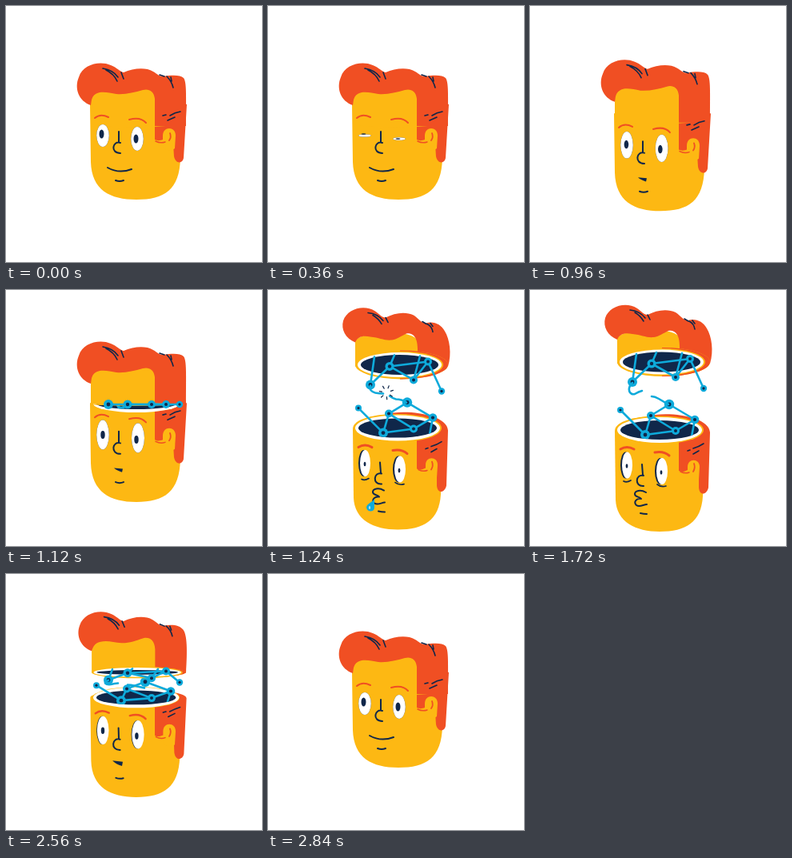
Animation, 320 px wide and 320 px high, one loop 2.88 s. Source, as an HTML page with a canvas:

```html
<!DOCTYPE html>
<html lang="en">
<head>
<meta charset="utf-8">
<title>Open mind</title>
<style>
html, body { margin: 0; width: 100%; height: 100%; overflow: hidden; background: #fff; }
canvas { display: block; width: 100vw; height: 100vh; }
</style>
</head>
<body>
<canvas id="stage" width="320" height="320"></canvas>
<script>
const ctx = document.getElementById('stage').getContext('2d');
const YELLOW = '#fdb813', RED = '#f04f23', NAVY = '#10274a', CYAN = '#0eaadb', WHITE = '#fff';
const LOOP = 2880;

// pose: 0 closed, 1 cracked, 2 wide open
let pose = 0;

const clamp = x => Math.max(0, Math.min(1, x));
const span = (t, a, b) => clamp((t - a) / (b - a));
const smooth = x => x * x * (3 - 2 * x);
const mix = (a, b, k) => a + (b - a) * k;

// Cracking lifts the lid and stretches the lower head.
const lidY = y => y - 7;
const headY = y => 265 + (y - 242) * 1.037;

// Blend a closed path into an open one; all coordinates are x y pairs.
function blend(closed, open, crackY) {
  const end = open.match(/-?[\d.]+/g);
  let i = 0;
  return closed.replace(/-?[\d.]+/g, n => {
    const from = +n, mid = i % 2 ? crackY(from) : from, to = +end[i++];
    return pose < 1 ? mix(from, mid, pose) : mix(mid, to, pose - 1);
  });
}

const tri = (a, b, c) => a.map((v, i) =>
  pose < 1 ? mix(v, b[i], pose) : mix(b[i], c[i], pose - 1));

function fill(d, color) {
  ctx.fillStyle = color;
  ctx.fill(new Path2D(d));
}

function line(d, color = NAVY, width = 1.8) {
  ctx.strokeStyle = color;
  ctx.lineWidth = width;
  ctx.stroke(new Path2D(d));
}

function oval([x, y, rx, ry], color) {
  ctx.fillStyle = color;
  ctx.beginPath();
  ctx.ellipse(x, y, Math.max(0, rx), Math.max(0, ry), 0, 0, 7);
  ctx.fill();
}

function shifted(dy, paint) {
  ctx.save();
  ctx.translate(0, dy);
  paint();
  ctx.restore();
}

function net(nodes, links, rimY, k) {
  const at = ([x, y]) => [x, rimY + y * k];
  for (const [a, b] of links) line(`M${at(nodes[a])} L${at(nodes[b])}`, CYAN, 2.6);
  for (const n of nodes) {
    if (!n[2]) continue;
    const [x, y] = at(n);
    oval([x, y, n[2], n[2]], CYAN);
    oval([x, y, n[2] * .4, n[2] * .4], NAVY);
  }
}

// Node heights are relative to the rim; a radius of 0 is a hidden anchor.
const lowNodes = [[113, -25, 4], [144, 6, 6], [151, -18, 5], [174, -32, 6.2], [182, 1, 5], [206, -13, 5.3], [202, 8, 0]];
const lowLinks = [[0, 1], [1, 2], [2, 3], [2, 4], [3, 5], [4, 5], [1, 4], [5, 6]];
const topNodes = [[128, 25, 6], [152, 2, 5.5], [182, 19, 5], [200, -4, 5], [217, 33, 4.2], [158, -12, 0], [190, -11, 0], [133, -10, 0]];
const topLinks = [[0, 1], [1, 2], [2, 3], [3, 4], [1, 5], [1, 3], [2, 6], [0, 7]];

function lowerHead() {
  fill(blend(
    'M105 123 L106 195 C107 230 130 242 163 242 C198 242 217 230 218 190 L222 123 C222 120 105 120 105 123',
    'M106 176 L107 262 C108 290 132 302 162 302 C195 302 214 290 216 258 L220 176 C220 151 106 151 106 176', headY), YELLOW);
  fill(blend(
    'M186 123 L186 167 C190 169 193 168 196 167 L209 172 L210 188 C212 198 221 197 222 190 L226 123 C226 122 186 122 186 123',
    'M186 176 L186 226 C190 228 193 227 197 225 L211 230 L211 247 C212 258 221 256 223 247 L225 178 C224 157 170 151 146 158', headY), RED);
  fill(blend(
    'M196 176 L196 162 C196 150 212 150 212 162 L211 178 C206 182 198 180 196 176',
    'M197 234 L197 221 C197 210 212 210 212 221 L211 237 C206 240 199 238 197 234', headY), YELLOW);
  line(blend('M205 159 Q207 164 204 168', 'M205 217 Q207 222 204 227', headY), RED);
  line(blend('M187 169 Q193 172 199 170', 'M188 227 Q194 230 199 228', headY), RED, 1.5);

  const rim = tri([163, 123, 54, 0], [163, 142, 54, 11], [162, 175, 53, 16]);
  const [x, y, rx, ry] = rim, edge = clamp(pose - 1);
  oval([x, y, rx + 2 * edge, ry + 1.5 * edge], YELLOW);
  oval(rim, WHITE);
  oval([x, y, rx - 4, ry - 4], NAVY);
  if (pose < .3 || ry < 5) return;
  ctx.save();
  ctx.beginPath();
  ctx.rect(0, -20, 320, y + 20);
  ctx.ellipse(x, y, rx - 4, ry - 4, 0, 0, Math.PI);
  ctx.clip();
  net(lowNodes, lowLinks, y, clamp(pose - .6) * clamp(pose / 2 + .1));
  ctx.restore();
}

function lid() {
  fill(blend(
    'M106 149 L106 118 C108 95 180 90 187 100 L200 150 Q155 154 106 149',
    'M109 92 L109 60 C115 48 180 44 187 60 L200 91 Q155 95 109 92', lidY), YELLOW);
  fill(blend(
    'M106 124 C91 119 85 103 91 89 C96 73 117 68 131 74 C139 77 142 82 147 83 C159 78 174 76 184 82 C189 85 192 88 196 88 C208 86 218 86 222 90 C226 95 225 112 225 150 L186 150 L186 116 C185 106 178 103 171 105 C160 108 149 111 138 110 C128 108 118 106 112 110 C106 114 107 120 106 124',
    'M109 62 C97 57 91 46 94 35 C99 20 120 14 134 23 C140 27 142 31 147 31 C158 25 172 23 182 28 C188 32 192 38 197 38 C207 35 216 39 221 48 C227 58 230 76 225 92 L187 91 L187 70 C187 54 180 50 173 51 C166 54 162 58 155 59 C145 60 140 56 128 55 C118 53 112 55 109 62', lidY), RED);
  line(blend(
    'M121 78 Q134 80 140 89 M125 80 Q135 85 139 94 M144 83 L147 91 M192 86 L198 88 M201 88 Q207 94 209 102 M206 89 L207 94',
    'M125 25 Q137 26 144 35 M131 28 Q138 32 142 39 M147 31 L150 37 M193 36 L198 39 M199 39 Q205 42 206 49 M203 38 L206 42', lidY), NAVY, 1.6);

  if (pose <= 1) return;
  const outer = tri([0, 0, 0, 0], [165, 143, 59, 0], [167, 90, 58, 18]);
  const [x, y, rx, ry] = tri([0, 0, 0, 0], [164, 143, 56, 0], [164.5, 90, 52.5, 15.5]);
  oval(outer, YELLOW);
  ctx.save();
  ctx.beginPath();
  ctx.rect(165, 0, 155, 320);
  ctx.clip();
  oval(outer, RED);
  ctx.restore();
  oval([x, y, rx + 2, ry + 1.5], YELLOW);
  oval([x, y, rx, ry], WHITE);
  oval([x, y, rx - 4, ry - 3], NAVY);
  net(topNodes, topLinks, y, pose - 1);
}

function brokenLink(t, bounce) {
  if (pose < 1.3) return;
  const k = pose - 1, curl = smooth(span(t, 1240, 1440));
  const bend = (a, b) => mix(a, b, curl);
  const up = y => mix(143, 90, k) + bounce + (y - 90) * k;
  const down = y => mix(142, 175, k) - .7 * bounce + (y - 175) * k;
  if (t < 1220) {
    line(`M128 ${up(115)} L173 ${down(143)}`, CYAN, 2.6);
    return;
  }
  line(`M128 ${up(116)} C${bend(126, 120)} ${up(bend(121, 124))} ${bend(130, 125)} ${up(bend(124, 132))} ${bend(134, 131)} ${up(bend(125, 130))} Q${bend(139, 136)} ${up(bend(126, 127))} ${bend(144, 140)} ${up(126)}`, CYAN, 2.6);
  line(`M173 ${down(143)} Q${bend(167, 166)} ${down(139)} ${bend(160, 161)} ${down(bend(139, 136))} Q156 ${down(bend(138, 133))} 152 ${down(bend(135, 133))}`, CYAN, 2.6);
  if (t < 1360) {
    const grow = span(t, 1160, 1360);
    for (let i = 0; i < 7; i++) {
      const a = i * Math.PI * 2 / 7 - 1.2, r = 4 + 4 * grow, end = r + 4 * (1.2 - grow);
      line(`M${148 + r * Math.cos(a)} ${128 + r * Math.sin(a)} L${148 + end * Math.cos(a)} ${128 + end * Math.sin(a)}`, NAVY, 1.2);
    }
  }
}

function face(t) {
  const brow = 2 + clamp(pose - 1);
  line(blend('M111 140 Q118 134 128 139', 'M113 199 Q121 194 130 199', headY), RED, brow);
  line(blend('M154 142 Q168 138 175 146', 'M156 203 Q167 201 174 207', headY), RED, brow);
  line(blend(
    'M196 137 L200 136 M205 137 Q211 133 218 132 M202 143 L211 139',
    'M197 201 L200 200 M204 198 Q211 196 217 192 M204 205 L211 201', headY), NAVY, 1.6);

  const blink = 1 - .92 * Math.sin(Math.PI * span(t, 220, 460));
  const shade = 2 * clamp(pose - 1);
  const eye = (a, b, c) => {
    const [x, y, rx, ry] = tri(a, b, c);
    oval([x - shade, y, rx, ry * blink], NAVY);
    oval([x, y, rx, ry * blink], WHITE);
  };
  const pupil = (a, b, c) => {
    const [x, y, rx, ry] = tri(a, b, c);
    oval([x, y, rx, ry * blink], NAVY);
  };
  eye([121, 162, 7.8, 14], [121, 181, 7.8, 18.5], [121.5, 219, 6.5, 16.5]);
  eye([164, 166, 7.8, 15], [165, 185, 8, 18.5], [165, 226.5, 7, 16.5]);
  pupil([119.5, 160, 3, 5.5], [121, 181, 2.7, 5], [121, 220, 1.4, 2.8]);
  pupil([162.5, 166, 3, 5.5], [163, 187, 2.7, 5], [164, 228, 1.4, 2.8]);

  line(blend(
    'M141 157 L141 170 M143 171 C133 168 130 184 143 184',
    'M140 218 L141 231 M142 232 C132 229 130 246 142 245', headY), NAVY, 2);

  if (pose < .5) line(blend('M127 202 Q141 210 157 204', 'M127 254 Q141 258 157 254', headY), NAVY, 2);
  else if (pose < 1.5) fill(blend('M135 201 L146 202 L145 206 Q138 204 135 201', 'M130 251 L146 253 L145 260 Q136 258 130 251', headY), NAVY);
  else line('M145 253 C138 249 131 251 131 255 C131 259 137 258 139 261 C133 260 129 265 133 269 C137 272 142 268 146 268', NAVY, 2);
  line(blend('M137 218 Q142 220 147 218', 'M138 279 Q142 280 146 280', headY), NAVY, 2);

  if (pose > 1.5) {
    ctx.globalAlpha = clamp(pose * 2 - 3);
    line('M117 239 Q121 241 126 238 M159 243 Q164 247 170 245', NAVY, 1.7);
    ctx.globalAlpha = 1;
  }
}

function drool(t) {
  if (t < 1180 || t > 1560) return;
  const grow = span(t, 1180, 1240), fall = Math.max(0, t - 1260) / 1000;
  ctx.save();
  ctx.translate(130, 263 + 900 * fall * fall);
  ctx.scale(grow, grow);
  fill('M3 -2 C1 2 -7 4 -7 9 C-6 15 3 15 3 9 C3 5 3 3 3 -2', CYAN);
  oval([-3, 9, 1.2, 2], '#9be0f7');
  ctx.restore();
}

function poseAt(t) {
  if (t < 1120) return smooth(span(t, 740, 1120));
  if (t < 2400) return 1 + smooth(span(t, 1120, 1240));
  return 2 * (1 - smooth(span(t, 2420, 2800)));
}

function draw(now) {
  const t = now % LOOP;
  pose = poseAt(t);
  ctx.fillStyle = WHITE;
  ctx.fillRect(0, 0, 320, 320);
  ctx.lineCap = ctx.lineJoin = 'round';
  const u = t - 1240;
  const bounce = u >= 0 && t < 1720 ? 3.5 * Math.exp(-u / 130) * Math.cos(u / 50) : 0;
  shifted(-.7 * bounce, lowerHead);
  shifted(bounce, lid);
  brokenLink(t, bounce);
  shifted(-.7 * bounce, () => face(t));
  drool(t);
}

const start = performance.now();
function tick() {
  draw(performance.now() - start);
  requestAnimationFrame(tick);
}
tick();
</script>
</body>
</html>
```
